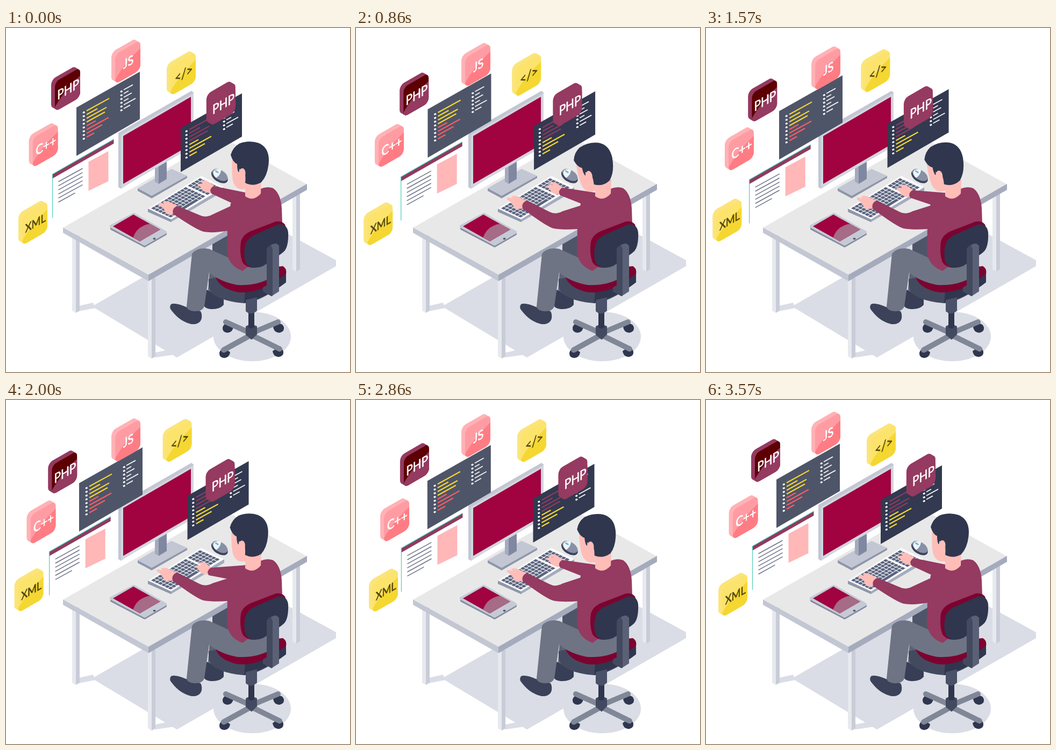
An HTML page for the animation above (3640 ms loop, 640 by 640 pixels).

```html
<!DOCTYPE html>
<html lang="en">
<head>
<meta charset="utf-8">
<title>Developer at a desk</title>
<style>
  html, body { margin: 0; width: 100%; height: 100%; overflow: hidden; background: #fff; }
  svg { display: block; width: 100vw; height: 100vh; }
  text { font-family: Lato, "Open Sans", sans-serif; text-anchor: middle; }
</style>
</head>
<body>
<svg viewBox="0 0 640 640">
  <defs>
    <clipPath id="face"><rect width="54.3" height="55.5" rx="9.5"/></clipPath>
    <clipPath id="tabletScreen"><path d="M199 369L237 347L287 375L249 397Z"/></clipPath>
  </defs>

  <!-- floor shadows -->
  <g fill="#dadde5">
    <path d="M160 518L458 347L614 432V443L318 613Z"/>
    <ellipse cx="458" cy="574" rx="72" ry="46"/>
  </g>

  <!-- desk -->
  <g fill="#e7e9ee">
    <path d="M123 385H130V530L123 526Z"/>
    <path d="M533 306H540V453L533 449Z"/>
    <path d="M264 465H271V615L264 611Z"/>
  </g>
  <g fill="#dadde5">
    <path d="M135 517L162 511L166 521L135 527Z"/>
    <path d="M277 604L305 598L318 607L277 613Z"/>
  </g>
  <g fill="#c8ccd7">
    <path d="M130 385H137V526L130 530Z"/>
    <path d="M540 303H547V449L540 453Z"/>
    <path d="M271 465H278V611L271 615Z"/>
  </g>
  <path fill="#4f5568" d="M384 400L415 382V432L384 416Z"/>
  <path fill="#e8e8e8" d="M107 371L402 203L560 291L265 460Z"/>
  <path fill="#c3c7d3" d="M106 371L265 459V471L106 381Z"/>
  <path fill="#a5abbd" d="M265 459L560 290V301L265 471Z"/>

  <!-- monitor -->
  <path fill="#8f96aa" d="M245 298L271 312L337 275V279L271 317L245 303Z"/>
  <path fill="#c3c7d3" d="M245 298L308 262L337 275L271 312Z"/>
  <path fill="#a5abbd" d="M277 255H284V290L277 286Z"/>
  <path fill="#8087a0" d="M284 255L299 246V281L284 290Z"/>
  <path fill="#c3c7d3" d="M209 195L345 117L349 120V214L214 299L209 296Z"/>
  <path fill="#d3d6df" d="M214 199L349 121V220L214 298Z"/>
  <path fill="#a0033f" d="M218 201L344 128V217L218 290Z"/>

  <g id="panels"></g>

  <!-- keyboard -->
  <path fill="#a5abbd" d="M264 336L307 355L406 296V303L307 361L264 342Z"/>
  <path fill="#8f96aa" d="M264 336L307 355V361L264 342Z"/>
  <path fill="#fafbfc" d="M264 336L363 275L406 296L307 356Z"/>
  <g id="keys"></g>

  <!-- mouse -->
  <g transform="rotate(32 397 275)">
    <ellipse cx="398" cy="276" rx="17" ry="10" fill="#3b435b"/>
    <ellipse cx="397" cy="273" rx="16" ry="9" fill="#8990a5"/>
    <path fill="#f1f3f7" d="M394 264A14 9 0 0 0 394 281.500Q398 273 394 264Z"/>
    <ellipse cx="389" cy="271" rx="4" ry="1.500" fill="#64c3d2"/>
  </g>

  <!-- tablet -->
  <path fill="#858ca1" stroke="#858ca1" stroke-width="6" stroke-linejoin="round" d="M197 373L238 349L296 383L258 405Z"/>
  <path fill="#c6cad5" stroke="#c6cad5" stroke-width="6" stroke-linejoin="round" d="M196 369L238 347L296 380L258 402Z"/>
  <g clip-path="url(#tabletScreen)">
    <path fill="#a0033f" d="M190 340H300V410H190Z"/>
    <path fill="#a56b87" d="M236 391Q243 368 269 364L300 375L260 405Z"/>
  </g>
  <ellipse cx="276" cy="392" rx="2.500" ry="1.700" fill="#4f5568"/>

  <!-- legs -->
  <path fill="#373e55" d="M374 487Q365 500 366 512Q368 522 381 523Q397 524 405 515V500Z"/>
  <path fill="#5d6375" d="M379 450L376 487Q385 497 402 497L405 460Z"/>
  <path fill="#3b4259" d="M307 514Q302 520 310 528Q324 546 345 551Q361 552 364 540Q365 532 362 527L335 519Q314 510 307 514Z"/>
  <path fill="#434a60" d="M377 467Q376 487 384 494Q403 509 443 512Q475 509 521 473V452L440 455Z"/>
  <path fill="#2f364e" d="M445 490Q480 485 521 455V473Q485 501 443 512Z"/>
  <path fill="#7c0330" d="M390 463Q395 479 416 487Q435 496 463 489Q490 482 521 457Q523 448 515 443L440 450Z"/>
  <path fill="#6f7484" d="M346 420Q356 407 378 411L420 430L490 436V466Q465 480 430 478Q398 472 378 455L369 518Q365 528 350 527Q337 526 336 518Z"/>

  <!-- far arm, torso, near arm -->
  <path id="farHand" fill="#ffbdb8"/>
  <path id="farArm" fill="#953a60"/>
  <path fill="#953a60" d="M446 306Q460 318 474 299Q486 294 497 298Q511 308 513 335L515 395L440 452Q413 442 411 415L412 372L418 326Z"/>
  <path id="nearHand" fill="#ffbdb8"/>
  <path id="nearArm" fill="#953a60"/>
  <path fill="#ffbdb8" d="M445 282H475L474 308Q460 324 445 313Z"/>

  <!-- head -->
  <g id="head">
    <path fill="#ffbdb8" d="M421 242Q419 264 422 284Q426 298 436 300Q448 301 456 296L470 272L455 245Z"/>
    <path fill="#2f364e" d="M418 236Q422 222 434 215Q452 208 470 214Q489 222 489 246Q488 273 475 287Q460 296 445 288Q446 280 445 272L434 262V269Q430 268 430 253Q422 250 418 236Z"/>
    <ellipse cx="439" cy="271" rx="6.500" ry="10" fill="#ffbdb8" transform="rotate(8 439 271)"/>
  </g>

  <!-- chair -->
  <path fill="#7c0330" d="M437 398Q440 384 458 377L502 360Q516 358 520 368L470 420L465 446Q447 447 440 436Q434 420 437 398Z"/>
  <path fill="#2f364e" d="M445 404Q449 389 469 382L505 366Q522 362 525 380Q526 407 517 416Q500 430 478 443Q460 450 449 441Q440 430 445 404Z"/>
  <path fill="#5a6177" d="M485 411Q494 400 503 401L508 405V490L494 499L478 490V483L485 479Z"/>
  <path fill="#434a60" d="M485 411Q487 406 493 404L496 411V498L494 499L478 490V483L485 479Z"/>
  <g fill="#2f364e">
    <path id="wheel" d="M403 557Q405 549 414 550L423 556Q422 566 412 567Q402 566 403 557Z"/>
    <use href="#wheel" transform="matrix(-1 0 0 1 920 0)"/>
    <use href="#wheel" x="-6" y="47"/>
    <use href="#wheel" transform="matrix(-1 0 0 1 919 45)"/>
  </g>
  <g fill="none" stroke-width="10" stroke-linecap="round">
    <path stroke="#808797" d="M409 547L456 568L506 547"/>
    <path stroke="#808797" d="M405 599L456 571L509 597"/>
  </g>
  <path fill="#434a60" d="M446 555Q456 548 467 555V570L457 580L446 571Z"/>
  <path fill="#2f364e" d="M451 525H462V557Q456 561 451 557Z"/>
  <path fill="#4a5168" d="M446 506L467 501V526Q456 536 446 527Z"/>

  <g id="tiles"></g>
</svg>
<script>
const $ = id => document.getElementById(id);
const wave = x => Math.cos(2 * Math.PI * x);
const slant = (x, y, len, slope = .55) => `M${x} ${y}l${len} ${-len * slope}`;
const stroke = (d, color, width) => `<path d="${d}" fill="none" stroke="${color}" stroke-width="${width}"/>`;
const shape = (d, fill) => `<path d="${d}" fill="${fill}"/>`;

// Code windows
const rows = (lens, x, y, step) => lens.map((len, i) => slant(x, y + i * step, len)).join('');

function codePanel(w, h, fill, colors, shiftX, shiftY) {
  const main = [42, 20, 37, 34, 17, 41, 29, 14], side = [17, 9, 15, 9, 22, 12];
  const dot = () => 3.5;
  return shape(`M0 0L${w} ${-w * .565}V${h - w * .58}L0 ${h}Z`, fill) +
    `<g transform="translate(${shiftX} ${shiftY})">` +
    stroke(rows(main.map(dot), 12, 10, 7) + rows(side.map(dot), 82, -29, 7), '#fff', 3) +
    stroke(rows(main.slice(0, 4), 19, 6, 7), colors[0], 2.2) +
    stroke(rows(main.slice(4), 19, 34, 7), colors[1], 2.2) +
    stroke(rows(side, 88, -33, 7), '#f4f5f8', 1.8) + '</g>';
}

const page = shape('M0 0L114 -65V16L0 81Z', '#fff') +
  shape('M0 0L114 -65V-57L0 8Z', '#8f3a60') +
  stroke('M0 81V0L114 -65', '#4bcdb8', 1.2) +
  shape('M67 -23L104 -43V13L67 31Z', '#ffb7b8') +
  stroke(rows([45, 45, 45, 45, 45, 31], 11, 14, 7.6), '#6d7388', 1.5);

// Each window drifts to one side and back.
const windows = [
  { x: 131, y: 148, dx: 5.2, dy: 7, art: codePanel(118, 90, '#4f5568', ['#f5d732', '#ff5c66'], 0, 0) },
  { x: 86.5, y: 272, dx: -6, dy: 10.5, art: page },
  { x: 325, y: 186, dx: 13, dy: -8, art: codePanel(114, 82, '#323950', ['#8f3a60', '#f5d732'], -3, -3) }
];

// Tiles: sway is [center, radius, phase of maximum] for x and y.
const pink = ['#ff9ca3', '#ff7c84', '#ffb2b5', '#fff'];
const gold = ['#fce36c', '#f5d732', '#fbe57a', '#54470f'];
const plum = ['#953a60', '#953a60', '#953a60', '#fff'];
const wine = ['#5c0003', '#953a60', '#953a60', '#fff'];
const round = [[-4.7, 6.5, .88], [-3.4, 6.7, .17]];
const tiles = [
  { x: 196, y: 22, label: 'JS', size: 23, look: pink, sway: [[0, 0, 0], [6.5, 6.5, .5]] },
  { x: 84, y: 73, label: 'PHP', size: 24, look: wine, sway: [[-3, 3, 0], [11, 11, .5]] },
  { x: 42, y: 177, label: 'C++', size: 24, look: pink, sway: [[-2.5, 5.7, .84], [5, 5.3, .59]] },
  { x: 23, y: 322, label: 'XML', size: 21, look: gold, sway: round },
  { x: 299, y: 44, label: '&lt;/&gt;', size: 24, look: gold, sway: round },
  { x: 373, y: 100, label: 'PHP', size: 24, look: plum, sway: [[-1.8, 5.2, .8], [4.9, 5.2, .57]] }
];

function tileArt({ label, size, look: [top, low, side, ink] }) {
  const iso = i => `matrix(.866 -.5 0 1 ${i} ${23.3 + i * 4 / 7})`;
  let art = '';
  for (let i = 0; i < 7; i++)
    art += `<rect width="54.3" height="55.5" rx="9.5" fill="${side}" transform="${iso(i)}"/>`;
  return art + `<g transform="${iso(7)}"><g clip-path="url(#face)">` +
    shape('M0 0H55V56H0Z', top) + shape('M0 47Q18 27 55 15V56H0Z', low) +
    `</g><text x="28.5" y="${27.7 + size * .36}" font-size="${size}" fill="${ink}" stroke="${ink}" stroke-width=".7">${label}</text></g>`;
}

function mount(items, parent, draw) {
  $(parent).innerHTML = items.map(o => `<g>${draw(o)}</g>`).join('');
  items.forEach((o, i) => o.node = $(parent).children[i]);
}
mount(windows, 'panels', o => o.art);
mount(tiles, 'tiles', tileArt);

// Keyboard keys, laid out on the slanted top
const key = (u, v, w, h) => {
  const at = (a, b) => `${264 + 99 * a + 43 * b} ${336 - 61 * a + 20 * b}`;
  return `M${at(u, v)}L${at(u + w, v)}L${at(u + w, v + h)}L${at(u, v + h)}Z`;
};
let keys = key(.27, .8, .24, .12);
for (let r = 0; r < 6; r++)
  for (let c = 0; c < 15; c++) {
    if (r === 5 && c > 3 && c < 8) continue;
    keys += key(.03 + c * .06 + (c > 10 ? .03 : 0), .07 + r * .146, .049, .12);
  }
$('keys').innerHTML = shape(keys, '#59627d');

// Eased value between [step, value] keys
function track(list, k) {
  const i = list.findIndex(p => p[0] > k);
  if (i < 0) return list[list.length - 1][1];
  const [a, x] = list[i - 1], [b, y] = list[i], s = (k - a) / (b - a);
  return x + (y - x) * s * s * (3 - 2 * s);
}
const nod = [[0, 0], [10, 1], [20, 1], [30, 0], [36, 0], [44, 1], [50, 0]];
const lift = [[0, 0], [6, 1], [39, 1], [44, 0], [50, 0]];
const reachX = [[0, 0], [7, -5], [17, 0], [28, -5], [35, 0], [45, -5], [50, 0]];
const reachY = [[0, 0], [7, 6], [17, 0], [28, 18], [35, 1], [45, 6], [50, 0]];

function pose(k) {
  const p = k / 50, drift = (1 - wave(p)) / 2;
  const move = (o, x, y) => o.node.setAttribute('transform', `translate(${o.x + x} ${o.y + y})`);
  for (const o of windows) move(o, o.dx * drift, o.dy * drift);
  for (const o of tiles) move(o, ...o.sway.map(([mid, r, at]) => mid + r * wave(p - at)));

  $('head').setAttribute('transform', `rotate(${-12.5 * track(nod, k)} 458 300)`);

  const fx = track(reachX, k), fy = track(reachY, k);
  $('farHand').setAttribute('transform', `translate(${fx} ${fy})`);
  $('farArm').setAttribute('d', `M${386 + fx} ${294 + fy}L450 307L445 340L425 ${328 + fy * .4}L${382 + fx} ${308 + fy}Q${377 + fx} ${300 + fy} ${386 + fx} ${294 + fy}Z`);

  const n = track(lift, k), y = -10 * n, e = -6 * n;
  $('nearHand').setAttribute('transform', `translate(${-3 * n} ${y})`);
  $('nearArm').setAttribute('d', `M${319 - n} ${331 + y}L360 ${348 + e}Q371 ${354 + e} 384 ${347 + e}L425 328L450 345L414 ${377 + e / 2}Q385 ${382 + e} 368 ${379 + e}Q355 ${376 + e} ${311 - n} ${346 + y}Q${308 - n} ${335 + y} ${319 - n} ${331 + y}Z`);
}

$('farHand').setAttribute('d', 'M388 294L375 285Q367 282 360 286L369 289L357 290Q354 293 361 295L366 302Q373 308 383 306Z');
$('nearHand').setAttribute('d', 'M320 331L303 323Q294 321 291 324L295 327L285 325Q281 328 287 331L294 337Q296 345 302 347L313 346Z');

// 14 poses a second
const LOOP = 3640;
function tick() {
  const t = performance.now() % LOOP;
  pose(Math.min(50, Math.floor((t + 5) * .014)));
  requestAnimationFrame(tick);
}
tick();
</script>
</body>
</html>
```
